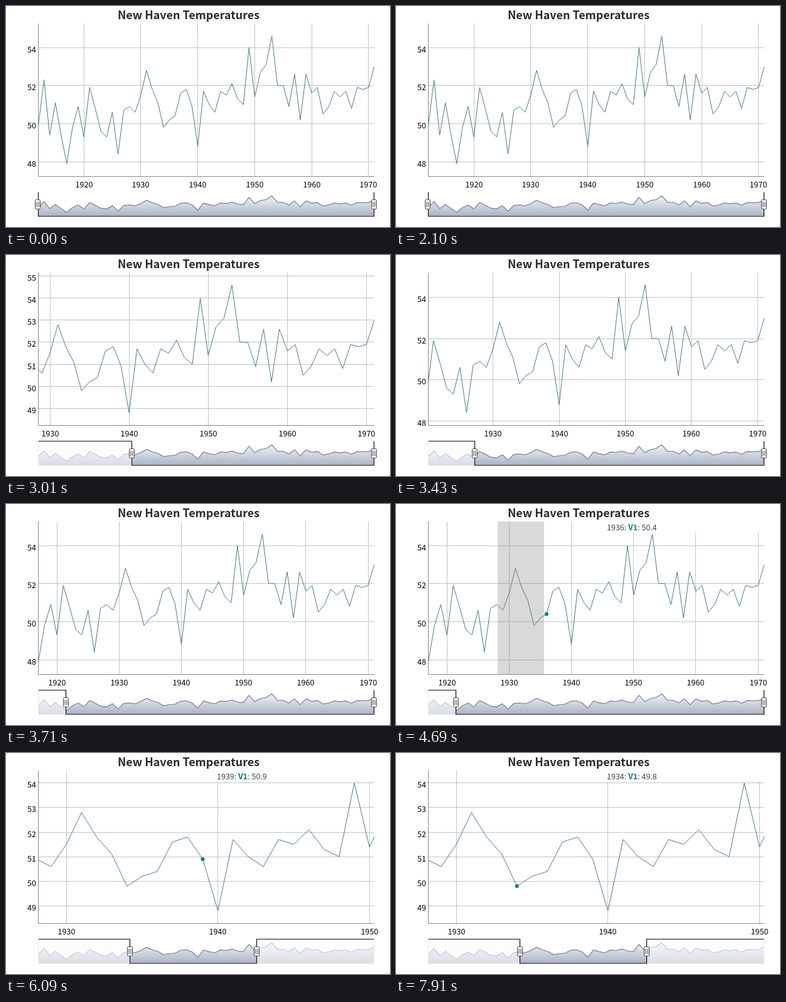
An HTML page for the animation above (8000 ms loop, 612x352 px).

```html
<!DOCTYPE html>
<html lang="en">
<head>
<meta charset="utf-8">
<title>Temperatures</title>
<style>
  html, body { margin: 0; width: 100%; height: 100%; overflow: hidden; background: #c4c4c4; }
  svg { display: block; width: 612px; height: 352px; }
  text { font-family: "Noto Sans CJK JP", "Noto Sans CJK SC", "Noto Sans CJK", "Noto Sans", sans-serif; font-size: 12.5px; fill: #000; }
  .title { font-size: 17.92px; font-weight: 700; fill: #2a2a2a; }
  .legend { fill: #444; }
  .legend .name { font-weight: 700; fill: #0b7f7b; }
  .grid { stroke: #c4c4c4; fill: none; }
</style>
</head>
<body>
<svg viewBox="0 0 612 352">
  <defs>
    <clipPath id="plot"><rect x="51" y="28" width="536" height="243"/></clipPath>
    <linearGradient id="shade" gradientUnits="userSpaceOnUse" x1="0" y1="297" x2="0" y2="335">
      <stop offset="0" stop-color="#fff"/><stop offset="1" stop-color="#a9b3c6"/>
    </linearGradient>
    <g id="grip">
      <rect x="-4" y="-7.5" width="8" height="15" rx="2" fill="#f4f4f4" stroke="#444"/>
      <path d="M-1.5-4v8M1.5-4v8" stroke="#444"/>
    </g>
  </defs>
  <rect width="612" height="352" rx="3" fill="#fff"/>
  <text class="title" x="291" y="21" text-anchor="middle">New Haven Temperatures</text>
  <path id="grid" class="grid"/>
  <path d="M51.5 28V271.5H587" fill="none" stroke="#8a8a8a"/>
  <g clip-path="url(#plot)">
    <path id="line" fill="none" stroke="#47807b"/>
  </g>
  <rect id="select" y="28" height="243" fill="#808080" fill-opacity=".3"/>
  <circle id="dot" r="3" fill="#0b7f7b"/>
  <g id="labels"></g>
  <g id="legend">
    <rect x="336" y="28" width="251" height="18" fill="#fff"/>
    <text class="legend" x="336" y="42"><tspan id="year"></tspan>: <tspan class="name">V1</tspan>: <tspan id="value"></tspan></text>
  </g>
  <path id="area" fill="url(#shade)"/>
  <path id="mini" fill="none" stroke="#838c9f" stroke-width="1.4"/>
  <path d="M51.5 297V335H586.5V297" fill="none" stroke="#d3d3d3"/>
  <path id="veil" fill="#fafafa" fill-opacity=".6"/>
  <path id="frame" fill="none" stroke="#111" stroke-width="1.2"/>
  <use id="gripA" href="#grip"/>
  <use id="gripB" href="#grip"/>
</svg>
<script>
const FIRST = 1912, LAST = 1971, LOOP = 8000, STEP = 70;
const LEFT = 51.5, WIDTH = 535.5, TOP = 27.5, HEIGHT = 244;
const temps = [
  49.9, 52.3, 49.4, 51.1, 49.4, 47.9, 49.8, 50.9, 49.3, 51.9,
  50.8, 49.6, 49.3, 50.6, 48.4, 50.7, 50.9, 50.6, 51.5, 52.8,
  51.8, 51.1, 49.8, 50.2, 50.4, 51.6, 51.8, 50.9, 48.8, 51.7,
  51.0, 50.6, 51.7, 51.5, 52.1, 51.3, 51.0, 54.0, 51.4, 52.7,
  53.1, 54.6, 52.0, 52.0, 50.9, 52.6, 50.2, 52.6, 51.6, 51.9,
  50.5, 50.9, 51.7, 51.4, 51.7, 50.8, 51.9, 51.8, 51.9, 53.0];

const el = id => document.getElementById(id);
const set = (id, attrs) => {
  for (const k in attrs) el(id).setAttribute(k, attrs[k]);
};
const show = (id, on) => set(id, { visibility: on ? "visible" : "hidden" });
const progress = (t, a, b) => Math.min(1, Math.max(0, (t - a) / (b - a)));
const smooth = u => u * u * (3 - 2 * u);
const pathOf = (x, y) => "M" + temps.map((v, i) =>
  x(FIRST + i).toFixed(2) + " " + y(v).toFixed(2)).join("L");
const label = (x, y, anchor, s) =>
  `<text x="${x}" y="${y}" text-anchor="${anchor}">${s}</text>`;

const PEAK = 1929.45, REST = 1917;
const PICK = { from: 1928.15, to: 1950.32 };
const PRESS = 4550, ZOOM = 5320;

// Visible span of years.
function span(t) {
  if (t >= ZOOM) return [PICK.from, PICK.to];
  const out = smooth(progress(t, 2100, 2800));
  const back = smooth(progress(t, 2870, 3710));
  return [FIRST + (PEAK - FIRST) * out + (REST - PEAK) * back, LAST];
}

// Year under the pointer while the selection is dragged.
function dragYear(t) {
  const fast = progress(t, PRESS, 4690), slow = progress(t, 4690, 5250);
  return PICK.from + 7.45 * fast + (PICK.to - PICK.from - 7.45) * slow;
}

// [start time, highlighted year]
const hovers = [
  [5810, 1942], [5880, 1941], [5950, 1940], [6090, 1939], [6510, 1938],
  [6720, 1937], [7140, 1936], [7560, 1935], [7700, 1934]];

function hoverYear(t) {
  if (t < 4200) return null;
  if (t < PRESS) return 1928;
  if (t < ZOOM) return Math.round(dragYear(t));
  const hit = hovers.filter(h => h[0] <= t).pop();
  return hit ? hit[1] : null;
}

// Value range with 10% padding, counting one neighbour on each side.
function valueRange(from, to) {
  const seen = temps.slice(Math.max(0, Math.floor(from - FIRST)), Math.ceil(to - FIRST) + 1);
  const lo = Math.min(...seen), hi = Math.max(...seen), pad = (hi - lo) * .1;
  return [lo - pad, hi + pad];
}

function tickStep(lo, hi) {
  return [1, 2, 5].find(s => HEIGHT / (Math.ceil(hi / s) - Math.floor(lo / s)) > 30);
}

const miniX = year => LEFT + (year - FIRST) / (LAST - FIRST) * WIDTH;
const miniY = v => 302.5 + (54.6 - v) * 3.9;
const miniPath = pathOf(miniX, miniY);
set("mini", { d: miniPath });
set("area", { d: miniPath + "V335H51.5Z" });

function drawChart(from, to, t) {
  const [lo, hi] = valueRange(from, to);
  const x = year => LEFT + (year - from) / (to - from) * WIDTH;
  const y = v => TOP + (hi - v) / (hi - lo) * HEIGHT;
  let grid = "", labels = "";

  const step = tickStep(lo, hi);
  for (let v = Math.ceil(lo / step) * step; v <= hi; v += step) {
    const py = Math.floor(y(v)) + .5;
    grid += `M52 ${py}H587`;
    labels += label(48, py + 7, "end", v);
  }
  for (let year = Math.ceil(from / 10) * 10; year <= to; year += 10) {
    const px = Math.floor(x(year)) + .5;
    grid += `M${px} 28V271`;
    labels += label(px, 289, "middle", year);
  }
  set("grid", { d: grid });
  el("labels").innerHTML = labels;
  set("line", { d: pathOf(x, y) });

  const dragging = t >= PRESS && t < ZOOM;
  show("select", dragging);
  if (dragging) set("select", { x: x(PICK.from), width: x(dragYear(t)) - x(PICK.from) });

  const year = hoverYear(t);
  show("dot", year !== null);
  show("legend", year !== null);
  if (year !== null) {
    const v = temps[year - FIRST];
    set("dot", { cx: x(year), cy: y(v) });
    el("year").textContent = year;
    el("value").textContent = v.toFixed(1);
  }
}

function drawRange(from, to) {
  const gripA = Math.floor(miniX(from)) - .5;
  const b = Math.min(586.5, Math.floor(miniX(to)) + .5);
  const a = Math.max(LEFT, gripA);
  set("veil", { d: `M51 297H${a}V335H51ZM${b} 297H587V335H${b}Z` });
  set("frame", { d: `M51.5 296.5H${a}V335H${b}V296.5H586.5` });
  set("gripA", { x: gripA, y: 316 });
  set("gripB", { x: b, y: 316 });
}

function draw(time) {
  const t = Math.floor(time % LOOP / STEP) * STEP;
  const [from, to] = span(t);
  drawChart(from, to, t);
  drawRange(from, to);
}

const start = performance.now();
function tick() {
  draw(performance.now() - start);
  requestAnimationFrame(tick);
}
tick();
</script>
</body>
</html>
```
